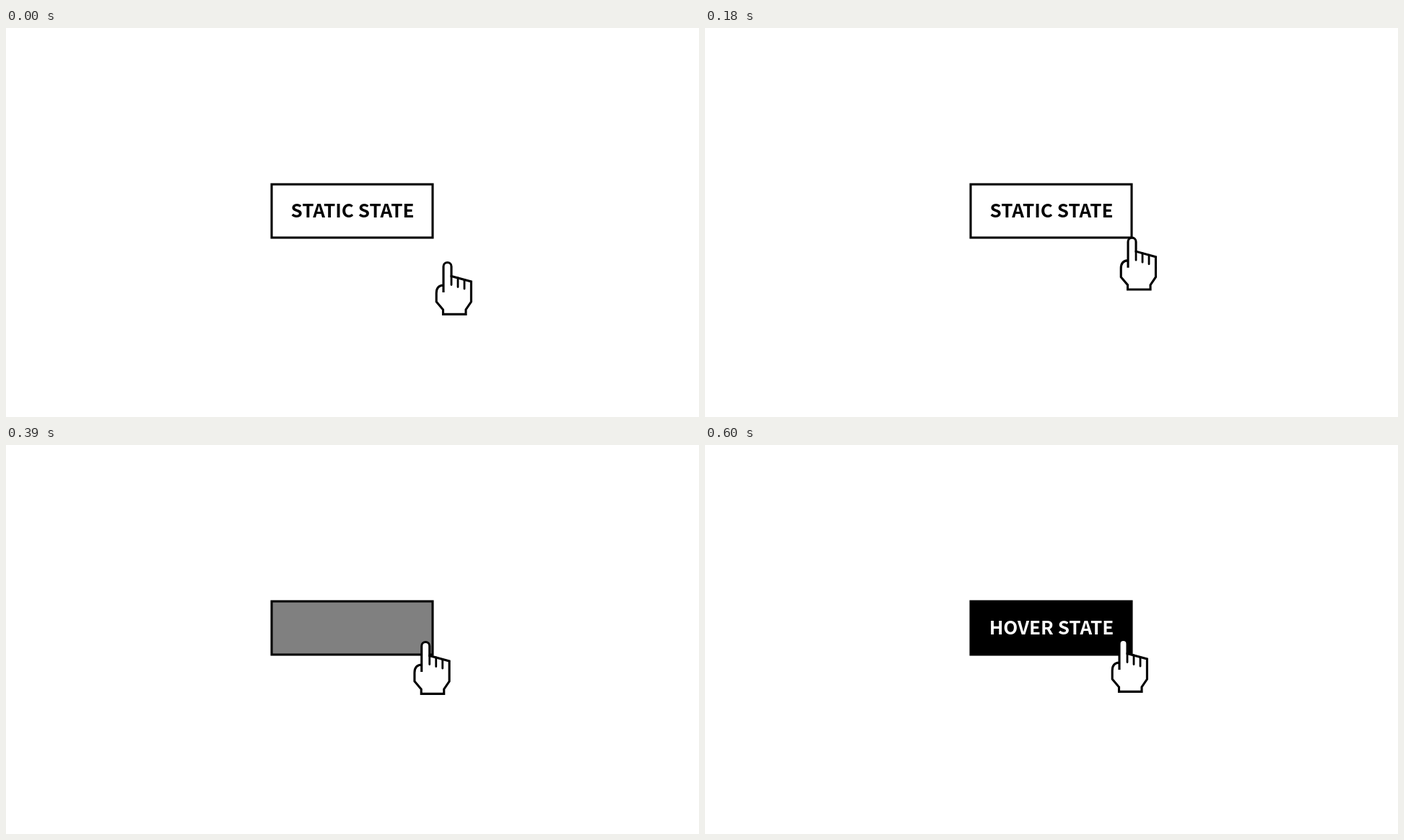
Write an HTML page that moves like this. It is 960x540 px and loops after 1.77 s.

```html
<!DOCTYPE html>
<html lang="en">
<head>
<meta charset="utf-8">
<title>Button hover</title>
<style>
  html, body { margin: 0; width: 100%; height: 100%; overflow: hidden; background: #fff; }
  svg { display: block; width: 960px; height: 540px; }
  text { font: bold 26px "Noto Sans CJK JP", "Noto Sans CJK SC", "Noto Sans CJK", "Open Sans", sans-serif; text-anchor: middle; }
  #button, #hand { stroke: #000; stroke-width: 3.1; }
</style>
</head>
<body>
<svg viewBox="0 0 960 540">
  <rect id="button" x="368" y="217" width="223" height="74"/>
  <text id="label" x="480" y="263.4"></text>
  <g id="hand" fill="#fff">
    <path d="M606 367V331a5.5 5.5 0 0 1 11 0V344.5L644.4 352V380L637 391V397.4H605.5V391L596.2 380V368Q596.2 357.5 606 357"/>
    <path fill="none" stroke-linecap="round" stroke-width="2.8" d="M617 344V356.5M626 347V359.5M635 349.5V362"/>
  </g>
</svg>
<script>
const LOOP = 1770, STEP = 30, MOVE = 600, FADE_START = 360, FADE = 60;
const [button, label, hand] = ["button", "label", "hand"].map(id => document.getElementById(id));
const clamp = v => Math.min(1, Math.max(0, v));

// cubic-bezier(1/3, 0, 0, 1), solved by bisection
function ease(x) {
  let lo = 0, hi = 1;
  for (let i = 0; i < 30; i++) {
    const u = (lo + hi) / 2;
    if (u * (1 - u) ** 2 + u ** 3 < x) lo = u; else hi = u;
  }
  return lo * lo * (3 - 2 * lo);
}

const grey = v => `rgb(${[v, v, v].map(c => Math.round(c * 255))})`;

function draw(time) {
  const t = Math.floor(time % LOOP / STEP) * STEP;
  const move = ease(clamp(t / MOVE));
  const fade = clamp((t - FADE_START) / FADE);
  hand.setAttribute("transform", `translate(${-32 * move} ${-55 * move})`);
  button.setAttribute("fill", grey(1 - fade));
  label.setAttribute("fill", grey(fade));
  label.textContent = fade < 0.5 ? "STATIC STATE" : "HOVER STATE";
}

let start;
function tick(now) {
  start ??= now;
  draw(now - start);
  requestAnimationFrame(tick);
}
draw(0);
requestAnimationFrame(tick);
</script>
</body>
</html>
```
